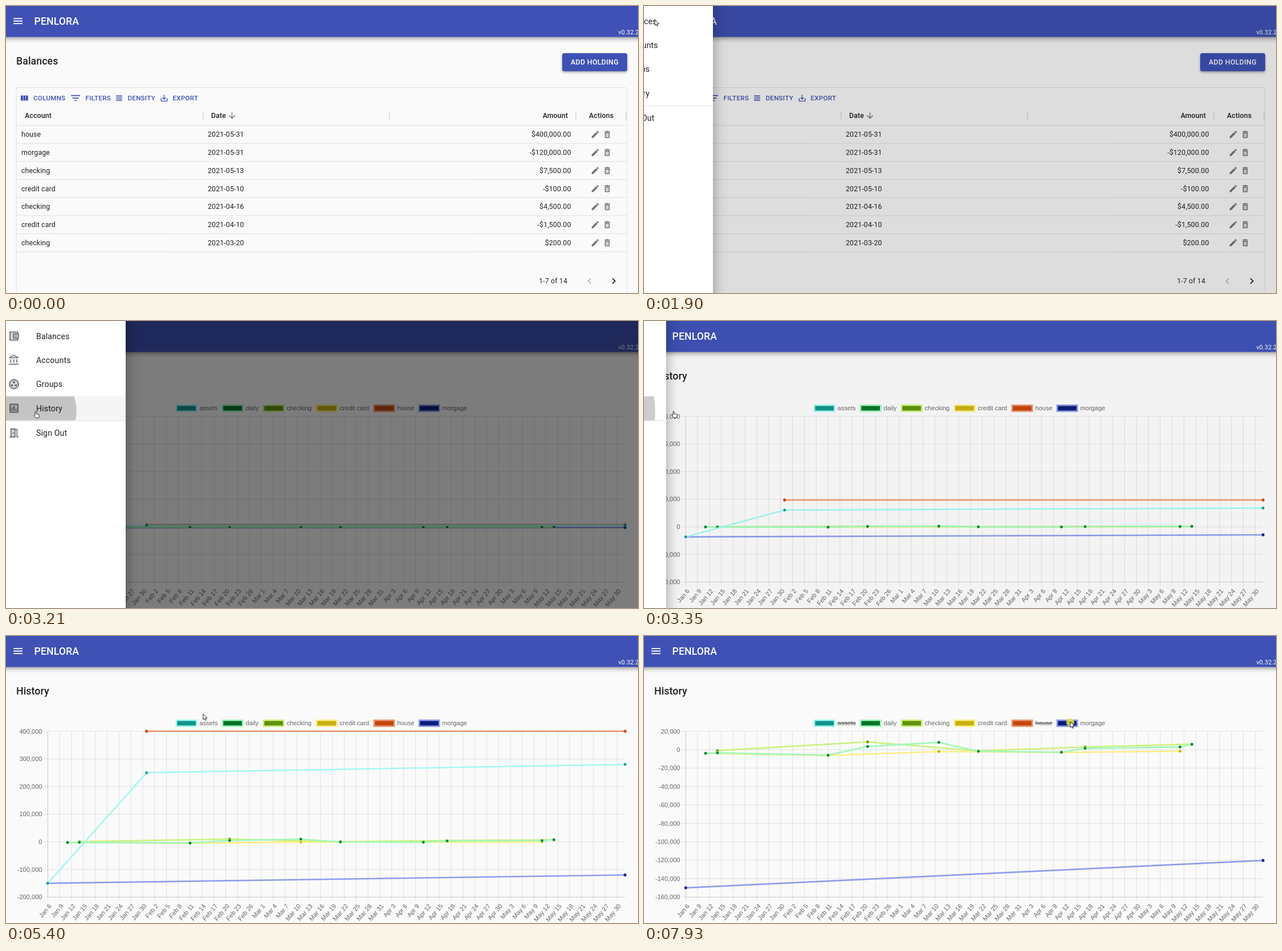
An HTML page with a canvas that plays this animation: 1109 px wide and 505 px high, repeating every 8 s.

```html
<!DOCTYPE html>
<html lang="en">
<head>
<meta charset="utf-8">
<title>Money tracker</title>
<style>
html, body { margin: 0; width: 100%; height: 100%; overflow: hidden; background: #fafafa; }
canvas { display: block; }
</style>
</head>
<body>
<canvas id="stage" width="1109" height="505"></canvas>
<script>
const W = 1109, H = 505, LOOP = 8000;
const ctx = document.getElementById('stage').getContext('2d');
const INDIGO = '#3f51b5', INK = 'rgba(0,0,0,.87)', GREY = 'rgba(0,0,0,.54)', RULE = '#e0e0e0';
const ROBOTO = 'Roboto, sans-serif', ARIAL = '"Liberation Sans", Arial, sans-serif';

// Moments of the story
const DRAWER_OPEN = 1845, RIPPLE = 3030, PAGE_SWAP = 3200, DRAWER_CLOSE = 3213;
const CHART_IN = 3284, HIDE_ASSETS = 6150, HIDE_HOUSE = 7280;

// ---- helpers ----
const clamp = v => Math.max(0, Math.min(1, v));
const lerp = (a, b, k) => a + (b - a) * k;
const outQuart = k => 1 - Math.pow(1 - clamp(k), 4);

function bezier(x1, y1, x2, y2) {
  const at = (a, b, s) => 3 * a * s * (1 - s) ** 2 + 3 * b * s * s * (1 - s) + s ** 3;
  return k => {
    k = clamp(k);
    let lo = 0, hi = 1;
    for (let i = 0; i < 24; i++) {
      const mid = (lo + hi) / 2;
      if (at(x1, x2, mid) < k) lo = mid; else hi = mid;
    }
    return at(y1, y2, hi);
  };
}
const easeOut = bezier(0, 0, .2, 1), easeInOut = bezier(.4, 0, .2, 1), sharp = bezier(.4, 0, .6, 1);

function text(s, x, y, { size = 12.35, weight = 400, color = INK, align = 'left', spacing = .0107, family = ROBOTO } = {}) {
  ctx.font = `${weight} ${size}px ${family}`;
  ctx.letterSpacing = `${size * spacing}px`;
  ctx.textAlign = align;
  ctx.textBaseline = 'alphabetic';
  ctx.fillStyle = color;
  ctx.fillText(s, x, y + size * .355);
}

function rect(x, y, w, h, color) {
  ctx.fillStyle = color;
  ctx.fillRect(x, y, w, h);
}

function line(x1, y1, x2, y2, color, width = 1) {
  ctx.strokeStyle = color;
  ctx.lineWidth = width;
  ctx.beginPath();
  ctx.moveTo(x1, y1);
  ctx.lineTo(x2, y2);
  ctx.stroke();
}

function disc(x, y, r, color) {
  ctx.fillStyle = color;
  ctx.beginPath();
  ctx.arc(x, y, r, 0, Math.PI * 2);
  ctx.fill();
}

function shadow(alpha, blur, dy) {
  ctx.shadowColor = `rgba(0,0,0,${alpha})`;
  ctx.shadowBlur = blur;
  ctx.shadowOffsetY = dy;
}

// Icons live in a 24 unit box and are placed by its centre.
const icons = {
  menu: 'M3 18h18v-2H3zM3 13h18v-2H3zM3 6v2h18V6z',
  columns: 'M4 6h5v12H4zM10 6h5v12h-5zM16 6h5v12h-5z',
  filter: 'M10 18h4v-2h-4zM3 6v2h18V6zM6 13h12v-2H6z',
  density: 'M4 15h16v-2H4zM4 19h16v-2H4zM4 11h16V9H4zM4 5v2h16V5z',
  save: 'M19 12v7H5v-7H3v7c0 1.1.9 2 2 2h14c1.1 0 2-.9 2-2v-7zM13 12.67l2.59-2.58L17 11.5l-5 5-5-5 1.41-1.41L11 12.67V3h2z',
  down: 'M20 12l-1.41-1.41L13 16.17V4h-2v12.17l-5.58-5.59L4 12l8 8z',
  edit: 'M3 17.25V21h3.75L17.81 9.94l-3.75-3.75zM20.71 7.04c.39-.39.39-1.02 0-1.41l-2.34-2.34c-.39-.39-1.02-.39-1.41 0l-1.83 1.83 3.75 3.75z',
  trash: 'M6 19c0 1.1.9 2 2 2h8c1.1 0 2-.9 2-2V7H6zM8 9h8v10H8zM15.5 4l-1-1h-5l-1 1H5v2h14V4z',
  left: 'M15.41 7.41L14 6l-6 6 6 6 1.41-1.41L10.83 12z',
  right: 'M10 6L8.59 7.41 13.17 12l-4.58 4.59L10 18l6-6z',
  wallet: 'M3 3h16a2 2 0 0 1 2 2v2a2 2 0 0 1 1 2v6a2 2 0 0 1-1 2v2a2 2 0 0 1-2 2H3zM5 5v14h14v-2h-7a2 2 0 0 1-2-2V9a2 2 0 0 1 2-2h7V5zM12 9v6h8V9zM14.5 10.5h3v3h-3z',
  bank: 'M6.5 10h-2v7h2zM12.5 10h-2v7h2zM21 19H2v2h19zM18.5 10h-2v7h2zM11.5 1L2 6v2h19V6zM11.5 3.3L17 6H6z',
  group: 'M12 2a10 10 0 1 0 .01 0zM12 4a8 8 0 1 1-.01 0zM12 6a2.2 2.2 0 1 0 .01 0zM8 12a2.2 2.2 0 1 0 .01 0zM16 12a2.2 2.2 0 1 0 .01 0z',
  bars: 'M5 3h14a2 2 0 0 1 2 2v14a2 2 0 0 1-2 2H5a2 2 0 0 1-2-2V5a2 2 0 0 1 2-2zM5 5v14h14V5zM7 10h2v7H7zM11 7h2v10h-2zM15 13h2v4h-2z',
  door: 'M5 3h10v1h4v15h2v2h-4V6h-2v15H3v-2h2zM7 5v14h6V5zM10 11h2v2h-2z'
};
for (const key in icons) icons[key] = new Path2D(icons[key]);

function icon(name, x, y, size, color, inner) {
  ctx.save();
  ctx.translate(x - size / 2, y - size / 2);
  ctx.scale(size / 24, size / 24);
  if (inner) rect(...inner, 'rgba(0,0,0,.16)');
  ctx.fillStyle = color;
  ctx.fill(icons[name], 'evenodd');
  ctx.restore();
}

// ---- pointer ----
const trail = [
  [530, 1105, 500], [1290, 34, 28], [1430, 19, 24], [2310, 19, 24], [2590, 50, 153],
  [2730, 52, 159], [4000, 52, 159], [4600, 367, 127], [4670, 365, 124], [5130, 365, 124],
  [5680, 326, 151], [6250, 326, 151], [6900, 653, 151], [7400, 655, 151], [7720, 748, 151]
];
const presses = [[1700, 1830], [2990, 3120], [6130, 6200], [7190, 7280], [7860, 8000]];

function pointerAt(t) {
  if (t < trail[0][0]) return null;
  const next = trail.findIndex(p => p[0] > t);
  if (next < 0) return trail[trail.length - 1].slice(1);
  const [t0, x0, y0] = trail[next - 1], [t1, x1, y1] = trail[next];
  const k = (t - t0) / (t1 - t0), s = k * k * (3 - 2 * k);
  return [lerp(x0, x1, s), lerp(y0, y1, s)];
}

const arrow = new Path2D('M0 0V11.5L2.7 9 4.4 12.8 6.2 12 4.6 8.3H8.2Z');
const hand = new Path2D('M-1.2 0.8Q0 -.8 1.2 .8V5Q2.6 4.2 3.4 5.4 4.7 4.8 5.4 6 6.9 5.7 7 7.2V9.5Q6.8 11.5 5.6 12.8H.2Q-1 10.8-3.6 8.4-3.6 6.6-1.2 7.8Z');

function drawPointer(t) {
  const p = pointerAt(t);
  if (!p) return;
  if (presses.some(([a, b]) => t >= a && t < b)) disc(p[0], p[1] + 1, 7, 'rgba(235,225,60,.85)');
  const overLink = (t > 1400 && t < 1880) || (t > 2110 && t < 3415);
  ctx.save();
  ctx.translate(p[0], p[1]);
  ctx.scale(.88, .88);
  ctx.lineWidth = 1.1;
  ctx.lineJoin = 'round';
  ctx.strokeStyle = '#222';
  ctx.fillStyle = '#fff';
  ctx.fill(overLink ? hand : arrow);
  ctx.stroke(overLink ? hand : arrow);
  ctx.restore();
}

// ---- table page ----
const rows = [
  ['house', '2021-05-31', '$400,000.00'], ['morgage', '2021-05-31', '-$120,000.00'],
  ['checking', '2021-05-13', '$7,500.00'], ['credit card', '2021-05-10', '-$100.00'],
  ['checking', '2021-04-16', '$4,500.00'], ['credit card', '2021-04-10', '-$1,500.00'],
  ['checking', '2021-03-20', '$200.00']
];
const heading = s => text(s, 18, 97, { size: 17.64, weight: 500, spacing: .0075 });

function drawTable(t) {
  heading('Balances');
  ctx.save();
  shadow(.35, 4, 2);
  ctx.fillStyle = INDIGO;
  ctx.beginPath();
  ctx.roundRect(976, 83, 114, 31.7, 3.5);
  ctx.fill();
  ctx.restore();
  text('ADD HOLDING', 1033, 99, { weight: 500, color: '#fff', align: 'center', spacing: .0286 });

  ctx.strokeStyle = RULE;
  ctx.lineWidth = 1;
  ctx.beginPath();
  ctx.roundRect(18, 143.5, 1071.7, 400, 3.5);
  ctx.stroke();

  icon('columns', 32, 162, 18, INDIGO);
  icon('filter', 122, 162, 21, INDIGO);
  icon('density', 198.5, 162, 16, INDIGO);
  icon('save', 277.5, 162, 16, INDIGO);
  [['COLUMNS', 48], ['FILTERS', 139.5], ['DENSITY', 213.5], ['EXPORT', 292.5]].forEach(([s, x]) =>
    text(s, x, 162, { size: 11.47, weight: 500, color: INDIGO, spacing: .0286 }));

  const head = { weight: 500 };
  text('Account', 33, 192.5, head);
  text('Date', 360, 192.5, head);
  text('Amount', 986, 192.5, { weight: 500, align: 'right' });
  text('Actions', 1023, 192.5, head);
  icon('down', 396.5, 193, 17, GREY);
  [346, 673, 1000, 1088].forEach(x => line(x, 186, x, 199, '#d8d8d8', 1.6));
  line(18, 210, 1090, 210, RULE);

  const p = pointerAt(t);
  rows.forEach(([account, date, amount], i) => {
    const y = 226 + 31.75 * i;
    if (p && Math.abs(p[1] - y) < 15.8 && t < 1300) rect(18, y - 15.5, 1071, 31.5, 'rgba(0,0,0,.04)');
    text(account, 27, y);
    text(date, 354, y);
    text(amount, 991.5, y, { align: 'right' });
    icon('edit', 1034, y, 16.8, GREY);
    icon('trash', 1055, y, 16.8, GREY, [7, 8, 10, 12]);
    line(18, y + 15.9, 1090, y + 15.9, RULE);
  });
  text('1-7 of 14', 985, 484, { align: 'right' });
  icon('left', 1024, 484, 21.2, 'rgba(0,0,0,.26)');
  icon('right', 1066.5, 484, 21.2, INK);
}

// ---- chart page ----
const LEFT = 73.3, RIGHT = 1086, TOP = 167.6, BOTTOM = 459.4, DAY = 6.938;
const wide = { max: 4e5, min: -2e5, step: 1e5 }, narrow = { max: 2e4, min: -1.6e5, step: 2e4 };
// Each series: legend place, colours and [day, value] points
const series = [
  { name: 'assets', x: 299, fill: '#11948c', edge: '#a3f8f1', data: [[0, -150e3], [25, 250e3], [146, 280e3]] },
  { name: 'daily', x: 380, fill: '#08742a', edge: '#a2f8bb', data: [[5, -2500], [8, -2000], [36, -4500], [46, 5000], [64, 9500], [74, -300], [95, -1300], [101, 3000], [125, 4400], [128, 7400]] },
  { name: 'checking', x: 452, fill: '#5f920a', edge: '#cdf27e', data: [[8, 500], [46, 1e4], [74, 200], [101, 4500], [128, 7500]] },
  { name: 'credit card', x: 545, fill: '#c8b010', edge: '#fdee88', data: [[5, -2500], [36, -5000], [64, -500], [95, -1500], [125, -100]] },
  { name: 'house', x: 646, fill: '#c5470b', edge: '#ec9a74', data: [[25, 4e5], [146, 4e5]] },
  { name: 'morgage', x: 725, fill: '#0a1f7a', edge: '#8f9eec', data: [[0, -150e3], [146, -120e3]] }
];
const hiddenFrom = { assets: HIDE_ASSETS, house: HIDE_HOUSE };
const yOn = (scale, v) => lerp(BOTTOM, TOP, (v - scale.min) / (scale.max - scale.min));
const label = { size: 11.1, color: '#666', spacing: 0, family: ARIAL };

function drawAxes(scale) {
  const grid = 'rgba(0,0,0,.1)';
  for (let v = scale.max; v >= scale.min; v -= scale.step) {
    const y = yOn(scale, v);
    line(LEFT - 7, y, RIGHT, y, grid);
    text(v.toLocaleString('en-US'), 63.5, y, { ...label, align: 'right' });
  }
  for (let d = 0; d <= 144; d += 3) {
    const x = LEFT + d * DAY;
    line(x, TOP, x, BOTTOM + 7, grid);
    const day = new Date(2021, 0, 6 + d).toLocaleDateString('en-US', { month: 'short', day: 'numeric' });
    ctx.save();
    ctx.translate(x + 4.2, 473);
    ctx.rotate(-50 * Math.PI / 180);
    text(day, 0, 0, { ...label, align: 'right' });
    ctx.restore();
  }
  line(LEFT, TOP, LEFT, BOTTOM, grid);
  line(LEFT, BOTTOM, RIGHT, BOTTOM, grid);
}

function drawLegend(t) {
  series.forEach(s => {
    ctx.fillStyle = s.fill;
    ctx.strokeStyle = s.edge;
    ctx.lineWidth = 2.65;
    ctx.fillRect(s.x, 148.2, 35.3, 10.6);
    ctx.strokeRect(s.x, 148.2, 35.3, 10.6);
    text(s.name, s.x + 40.5, 153.3, label);
    if (t >= hiddenFrom[s.name]) {
      line(s.x + 40.5, 153.4, s.x + 40.5 + ctx.measureText(s.name).width, 153.4, '#666', 1.7);
    }
  });
}

function drawSeries(s, yOf, alpha) {
  const pts = s.data.map(([d, v]) => [LEFT + d * DAY, yOf(v)]);
  ctx.globalAlpha = alpha;
  ctx.strokeStyle = s.edge;
  ctx.lineWidth = 2.65;
  ctx.lineJoin = 'miter';
  ctx.beginPath();
  pts.forEach(([x, y]) => ctx.lineTo(x, y));
  ctx.stroke();
  pts.forEach(([x, y]) => {
    disc(x, y, 2.65, s.fill);
    ctx.lineWidth = .88;
    ctx.stroke();
  });
  ctx.globalAlpha = 1;
}

function drawChart(t) {
  heading('History');
  drawAxes(t < HIDE_HOUSE ? wide : narrow);
  drawLegend(t);
  const grow = Math.max(.02, outQuart((t - CHART_IN) / 1000));
  const zoom = outQuart((t - HIDE_HOUSE) / 1000);
  const yOf = v => lerp(lerp(yOn(wide, 0), yOn(wide, v), grow), yOn(narrow, v), zoom);
  ctx.save();
  ctx.beginPath();
  ctx.rect(LEFT - 5, TOP - 4, RIGHT - LEFT + 10, BOTTOM - TOP + 8);
  ctx.clip();
  [...series].reverse().forEach(s => {
    const start = hiddenFrom[s.name];
    const alpha = start ? 1 - outQuart((t - start) / 1000) : 1;
    if (alpha > .004) drawSeries(s, yOf, alpha);
  });
  ctx.restore();
}

// ---- shell ----
function drawBar(t) {
  ctx.save();
  shadow(.42, 8, 2.5);
  rect(-20, -20, W + 40, 74.5, INDIGO);
  ctx.restore();
  if (t >= 1700 && t < 2100) {
    const k = easeInOut((t - 1700) / 300);
    disc(21, 26.5, 21 * k, `rgba(255,255,255,${.28 * (1 - clamp((t - 1850) / 250))})`);
  }
  icon('menu', 21, 26.5, 21.2, '#fff');
  text('PENLORA', 49.5, 26.5, { size: 17.64, weight: 500, color: '#fff', spacing: .0075 });
  text('v0.32.2', 1074.5, 46, { size: 10.8, color: '#fff' });
}

const menu = [
  ['Balances', 26.5, 'wallet', [4, 4, 16, 16]], ['Accounts', 69, 'bank'],
  ['Groups', 111.2, 'group'], ['History', 153.5, 'bars', [4, 4, 16, 16]],
  ['Sign Out', 197, 'door', [6, 4, 8, 16]]
];

function drawDrawer(t) {
  const closing = t >= DRAWER_CLOSE;
  const k = closing ? (t - DRAWER_CLOSE) / 195 : (t - DRAWER_OPEN) / 225;
  if (k <= 0 && !closing || closing && k >= 1) return;
  const shown = closing ? 1 - sharp(k) : easeOut(k);
  const dim = closing ? 1 - easeInOut(k) : easeInOut(k);
  rect(0, 0, W, H, `rgba(0,0,0,${.5 * dim})`);

  ctx.save();
  ctx.translate(-210 * (1 - shown), 0);
  ctx.save();
  shadow(.36, 22, 7);
  rect(-40, -40, 250, H + 80, '#fff');
  ctx.restore();

  const p = pointerAt(t);
  menu.forEach(([name, y, glyph, inner]) => {
    if (t > 2110 && !closing && Math.abs(p[1] - y) < 21.1) rect(0, y - 21.1, 210, 42.3, 'rgba(0,0,0,.04)');
    if (name === 'History' && t > RIPPLE) {
      ctx.save();
      ctx.beginPath();
      ctx.rect(0, y - 21.1, 210, 42.3);
      ctx.clip();
      disc(52, 158, 161 * easeInOut((t - RIPPLE) / 550), 'rgba(0,0,0,.2)');
      ctx.restore();
    }
    if (glyph === 'group') disc(14, y, 8, 'rgba(0,0,0,.16)');
    icon(glyph, 14, y, 21.2, GREY, inner);
    text(name, 53, y, { size: 14.11, spacing: .0094 });
  });
  line(0, 175.5, 210, 175.5, RULE);
  ctx.restore();
}

function draw(t) {
  rect(0, 0, W, H, '#fafafa');
  if (t < PAGE_SWAP) drawTable(t); else drawChart(t);
  drawBar(t);
  drawDrawer(t);
  drawPointer(t);
}

const began = performance.now();
function tick() {
  draw((performance.now() - began) % LOOP);
  requestAnimationFrame(tick);
}
tick();
</script>
</body>
</html>
```
